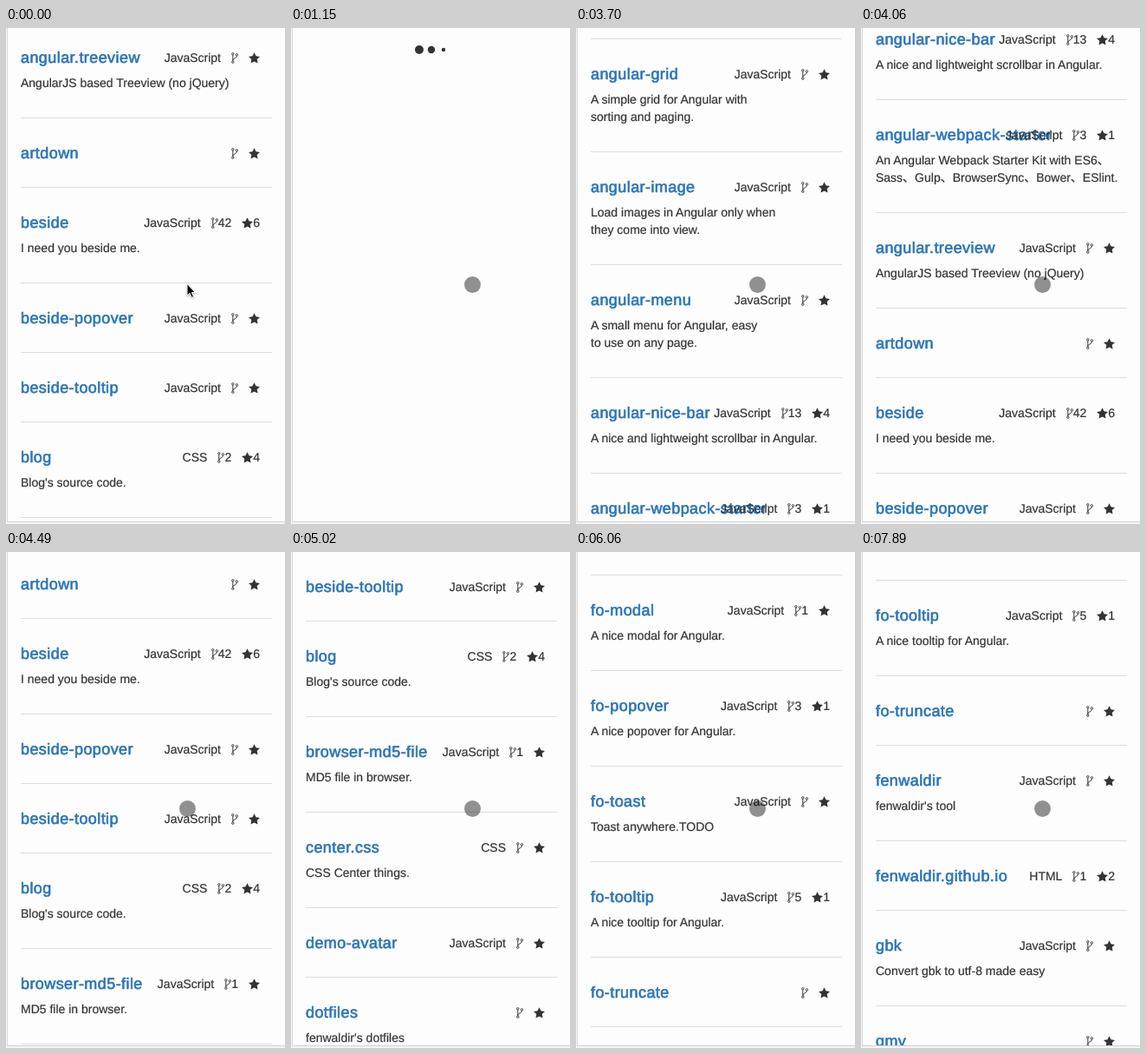
Recreate the animation shown at these times as an HTML page. Size 322x571 px, loop 8 s.

```html
<!DOCTYPE html>
<html lang="en">
<head>
<meta charset="utf-8">
<title>Repository list</title>
<style>
html, body { margin: 0; width: 100%; height: 100%; overflow: hidden; background: #f5f5f5; }
body { position: relative; font: 14px/20px "Liberation Sans", "Noto Sans CJK SC", "Noto Sans CJK", Arial, sans-serif; color: #333;
  text-rendering: geometricPrecision; -webkit-text-stroke: .2px; }
#page { position: absolute; left: 1px; top: 0; width: 321px; height: 568px; box-sizing: border-box; overflow: hidden;
  background: #fdfdfd; border-left: 1px solid #d9d9d9; box-shadow: 0 1px #d2d2d2; }
#list { position: absolute; left: 15px; top: 30px; width: 290px; will-change: transform; }
.item { position: relative; padding-bottom: 29px; margin-bottom: 30px; border-bottom: 1px solid #ddd; }
.item.text { padding-bottom: 30px; }
.item { margin-bottom: 30px; }
h4 { margin: 0; font: 18px/20px "Liberation Sans", Arial, sans-serif; letter-spacing: .42px; color: #2b75b6; -webkit-text-stroke: .65px; white-space: nowrap; }
p { margin: 0; padding-top: 9px; white-space: pre; }
.meta { position: absolute; right: 14px; top: 0; display: flex; gap: 12px; white-space: nowrap; }
.meta span { display: flex; align-items: center; height: 20px; }
.fork { width: 8px; height: 13px; fill: none; stroke: #333; stroke-width: .95; }
.star { width: 13px; height: 13px; fill: #333; }
.dot { position: absolute; left: 0; top: 0; width: 10px; height: 10px; border-radius: 50%; background: #333; }
#loader { position: absolute; left: 141px; top: 20px; }
#arrow, #touch { position: absolute; }
#arrow { left: 205px; top: 291px; filter: drop-shadow(0 1px 1px rgba(0, 0, 0, .35)); }
#touch { left: 200px; top: 286px; width: 19px; height: 19px; border-radius: 50%; background: rgba(0, 0, 0, .43); }
</style>
</head>
<body>
<div id="page">
  <div id="list"></div>
  <div id="loader"><i class="dot"></i><i class="dot"></i><i class="dot"></i></div>
</div>
<svg id="arrow" width="18" height="23">
  <path d="M4 3.5V17.2L7.1 14.3L9.3 19.3L11.5 18.3L9.4 13.5H13.5Z" fill="#000" stroke="#fff"/>
</svg>
<div id="touch"></div>
<script>
// title | language | forks | stars | description
const repos = `angular-alert|JavaScript|||
angular-grid|JavaScript|||A simple grid for Angular with
sorting and paging.
angular-image|JavaScript|||Load images in Angular only when
they come into view.
angular-menu|JavaScript|||A small menu for Angular, easy
to use on any page.
angular-nice-bar|JavaScript|13|4|A nice and lightweight scrollbar in Angular.
angular-webpack-starter|JavaScript|3|1|An Angular Webpack Starter Kit with ES6、
Sass、Gulp、BrowserSync、Bower、ESlint.
angular.treeview|JavaScript|||AngularJS based Treeview (no jQuery)
artdown||||
beside|JavaScript|42|6|I need you beside me.
beside-popover|JavaScript|||
beside-tooltip|JavaScript|||
blog|CSS|2|4|Blog's source code.
browser-md5-file|JavaScript|1||MD5 file in browser.
center.css|CSS|||CSS Center things.
demo-avatar|JavaScript|||
dotfiles||||fenwaldir's dotfiles
fevimrc|VimL|2||vimrc config
fexo|CSS|471|73|A minimalist design theme for hexo.
file-base64|JavaScript|1||Encode or Decode base64 use stream
fim|JavaScript|||Test private method easy.
flex-align||||
flexout||||
fo-modal|JavaScript|1||A nice modal for Angular.
fo-popover|JavaScript|3|1|A nice popover for Angular.
fo-toast|JavaScript|||Toast anywhere.TODO
fo-tooltip|JavaScript|5|1|A nice tooltip for Angular.
fo-truncate||||
fenwaldir|JavaScript|||fenwaldir's tool
fenwaldir.github.io|HTML|1|2|
gbk|JavaScript|||Convert gbk to utf-8 made easy
gmy||||`.split(/\n(?=[^\n|]+\|)/);

const fork = '<svg class="fork" viewBox="0 0 8 13"><circle cx="1.8" cy="1.8" r="1.2"/><circle cx="1.8" cy="11.2" r="1.2"/>' +
  '<circle cx="6.4" cy="2.8" r="1.2"/><path d="M1.8 3V10M6.4 4C6.4 7.6 1.8 6.4 1.8 9.4"/></svg>';
const star = '<svg class="star" viewBox="0 0 13 13"><path d="M6.5 .2L8.5 4.3L13 5L9.7 8.1L10.5 12.6L6.5 10.5L2.5 12.6L3.3 8.1L0 5L4.5 4.3Z"/></svg>';

const $ = id => document.getElementById(id);
const list = $('list'), loader = $('loader'), dots = [...loader.children];

list.innerHTML = repos.map(row => {
  const [title, lang, forks, stars, text] = row.split('|');
  return `<div class="item${text ? ' text' : ''}"><h4>${title}</h4>` +
    `<div class="meta">${lang ? `<span>${lang}</span>` : ''}<span>${fork}${forks}</span><span>${star}${stars}</span></div>` +
    (text ? `<p>${text}</p>` : '') + '</div>';
}).join('');
const nextPage = list.lastElementChild;

const LOOP = 8000, START = 968, STEP = 87.4;

// step, scroll offset, speed per step
const path = [[30, 0, 50], [35, 497, 105], [46, 1090, 70], [53, 1705, 95], [58, 2263, 140], [60, 2587, 170]];

function scrollAt(k) {
  if (k < 0) return 716;
  if (k <= 30) return 0;
  const i = path.findIndex(p => k <= p[0]);
  if (i < 0) return 2587;
  const [k0, y0, v0] = path[i - 1], [k1, y1, v1] = path[i];
  const d = k1 - k0, u = (k - k0) / d, w = 1 - u;
  return y0 * w * w * (1 + 2 * u) + y1 * u * u * (3 - 2 * u) + d * u * w * (v0 * w - v1 * u);
}

const smooth = x => x * x * (3 - 2 * x);

// Each dot grows and shrinks within 1120 ms, then rests until 1400 ms
function dotScale(ms) {
  const t = ((ms % 1400) + 1400) % 1400;
  return t < 1120 ? smooth(1 - Math.abs(t - 560) / 560) : 0;
}

function show(el, on) { el.style.visibility = on ? 'visible' : 'hidden'; }

function draw(now) {
  const t = now % LOOP;
  const k = Math.floor((t - START) / STEP);
  const first = k >= 0 && k < 24, more = k >= 60 && k < 79;

  show(list, !first);
  list.style.transform = `translateY(${-Math.round(scrollAt(k))}px)`;
  nextPage.style.display = k < 0 || k >= 79 ? '' : 'none';

  show(loader, first || more);
  loader.style.top = more ? '543px' : '20px';
  const phase = more ? 1000 + (k - 71) * STEP : 170 + (k - 17) * STEP;
  dots.forEach((dot, i) => {
    dot.style.transform = `translateX(${14 * i}px) scale(${dotScale(phase + 160 * (2 - i))})`;
  });

  show($('arrow'), t < 620);
  show($('touch'), t >= 620);
}

const begin = performance.now();
function tick() {
  draw(performance.now() - begin);
  requestAnimationFrame(tick);
}
tick();
</script>
</body>
</html>
```
